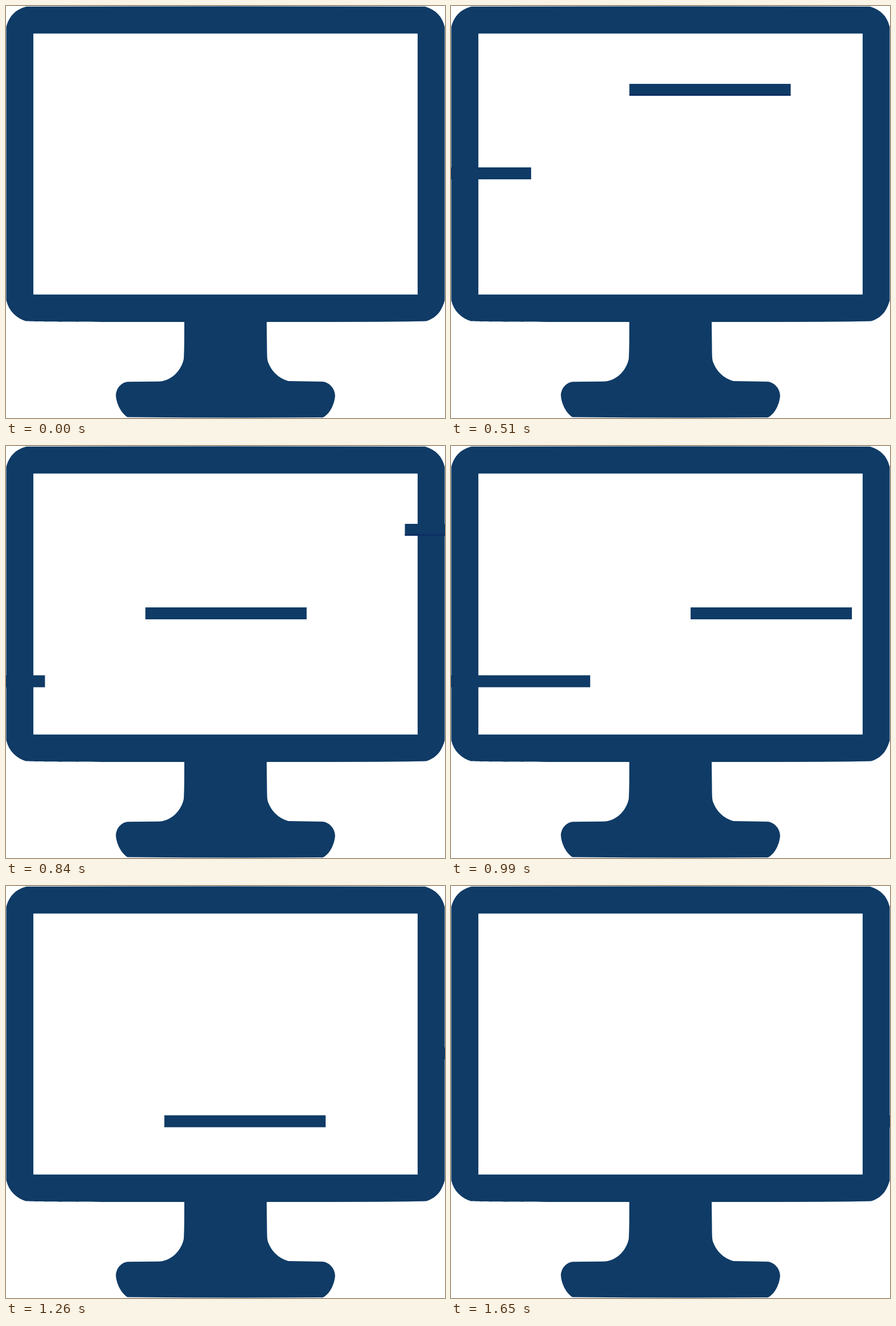
Recreate the animation shown at these times as an HTML page with a canvas. Size 773 px wide and 725 px high, loop 1680 ms.

```html
<!DOCTYPE html>
<html lang="en">
<head>
<meta charset="utf-8">
<title>Monitor</title>
<style>
  html, body { margin: 0; width: 100%; height: 100%; overflow: hidden; background: #fff; }
  canvas { display: block; width: 100%; height: 100%; }
</style>
</head>
<body>
<canvas id="stage" width="773" height="725"></canvas>
<script>
const ctx = document.getElementById('stage').getContext('2d');
const NAVY = '#0f3b66';
const SHADE = '#0c2f63';
const LOOP = 1680;
const STEP = 30;
const SPEED = 35.3; // pixels per step
const BAR = { w: 284, h: 21 };

// head: right edge at the start of the loop
const bars = [
  { y: 137, head: -2, shaded: true },
  { y: 284, head: -459 },
  { y: 403.5, head: -919.8 }
];

const shell = new Path2D(`
  M36 1 Q386 0 738 1 C757 7 768 18 772.5 37
  V518 C767 538 757 549 740 554.5 Q700 556 459 556
  L459.5 600 C459.7 615 459.5 622 462 628 C468 643 480 655 497 660
  L557 661 C570 662 579.5 674 579.5 686 C578 703 569 719 558 724
  Q386 725 214 723.5 C203 717 194.5 700 193.5 686
  C193.5 673 203 662 215 661.3 L268 660.8 C293 660 309 640 313 621
  C314 605 314 580 314 556 C100 556 50 555.5 35 554.5
  C18 549 5 537 0.5 518 V37 C5 19 16 6 36 1 Z`);

function drawMonitor() {
  ctx.fillStyle = NAVY;
  ctx.fill(shell);
  ctx.fillStyle = '#fff';
  ctx.fillRect(48.2, 48.5, 676.6, 459.2);
}

function drawBar({ y, head, shaded }, step) {
  const x = head + SPEED * step - BAR.w;
  ctx.fillStyle = NAVY;
  ctx.fillRect(x, y, BAR.w, BAR.h);
  if (shaded) {
    ctx.fillStyle = SHADE;
    ctx.fillRect(x, y + BAR.h - 3, BAR.w, 3);
  }
}

function draw(now) {
  const step = Math.floor((now % LOOP) / STEP);
  ctx.fillStyle = '#fff';
  ctx.fillRect(0, 0, 773, 725);
  drawMonitor();
  bars.forEach(bar => drawBar(bar, step));
}

let start;
function tick(now) {
  start ??= now;
  draw(now - start);
  requestAnimationFrame(tick);
}
draw(0);
requestAnimationFrame(tick);
</script>
</body>
</html>
```
